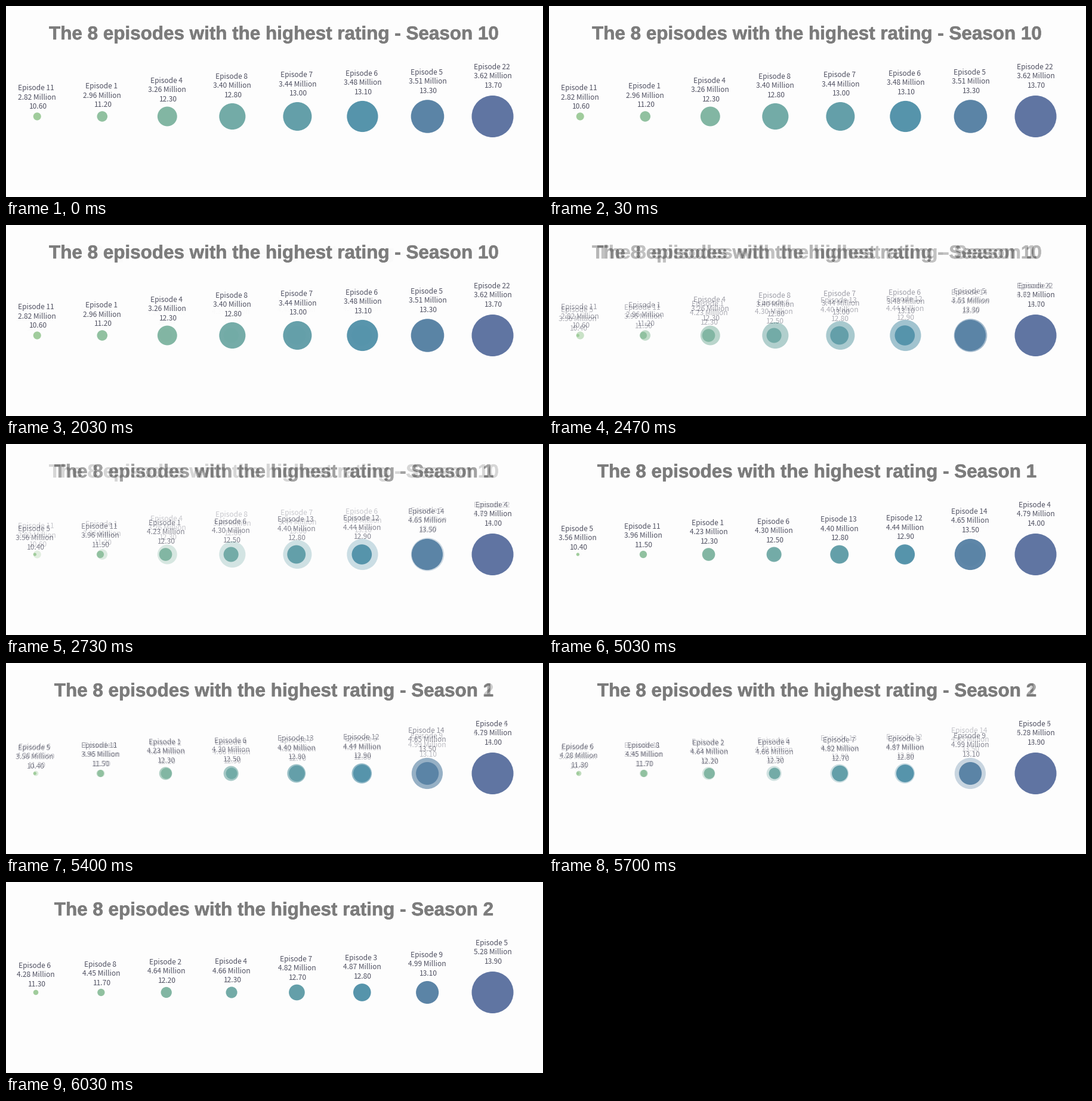
A matplotlib script for the animation above (8 s loop, 900 by 320 pixels).

```python
import numpy as np
import matplotlib.pyplot as plt
from matplotlib.animation import FuncAnimation
from matplotlib.colors import LinearSegmentedColormap
from matplotlib.patches import Circle
from matplotlib.patheffects import withStroke

W, H, DPI = 900, 320, 100
LOOP, STEP = 8000, 32
HOLD, PERIOD, FADE = 2000, 3000, 1030

BG, TITLE, LABEL = "#fdfdfd", "#7c7c7c", "#505162"
SHADES = LinearSegmentedColormap.from_list("bubbles", [
    (0, "#a0cc9c"), (3 / 7, "#73aba7"), (5 / 7, "#5694ab"), (1, "#6075a2")])

R_MAX, GROWTH = 35, 2.1          # bubble size grows exponentially with viewers
LEFT, RIGHT, MID_Y = 45.7, 815.5, 185
LINE = 15.5

# season: "episode viewers rating", least watched first
SEASONS = {
    10: "11 2.82 10.60, 1 2.96 11.20, 4 3.26 12.30, 8 3.40 12.80, "
        "7 3.44 13.00, 6 3.48 13.10, 5 3.51 13.30, 22 3.62 13.70",
    1: "5 3.56 10.40, 11 3.96 11.50, 1 4.23 12.30, 6 4.30 12.50, "
       "13 4.40 12.80, 12 4.44 12.90, 14 4.65 13.50, 4 4.79 14.00",
    2: "6 4.28 11.30, 8 4.45 11.70, 2 4.64 12.20, 4 4.66 12.30, "
       "7 4.82 12.70, 3 4.87 12.80, 9 4.99 13.10, 5 5.28 13.90",
}

fig = plt.figure(figsize=(W / DPI, H / DPI), dpi=DPI, facecolor=BG)


def stage():
    ax = fig.add_axes([0, 0, 1, 1])
    ax.set(xlim=(0, W), ylim=(H, 0))
    ax.axis("off")
    return ax


def write(ax, x, y, text, px, color, font, **style):
    ax.text(x, y, text, fontsize=px * 72 / DPI, color=color, family=font,
            ha="center", va="baseline", **style)


def render(season, rows):
    """Draw one season's chart and return it as an RGB array."""
    ax = stage()
    write(ax, 449.5, 56, f"The 8 episodes with the highest rating - Season {season}",
          31.4, TITLE, "Liberation Sans", weight="bold",
          path_effects=[withStroke(linewidth=0.4, foreground=TITLE)])

    rows = [row.split() for row in rows.split(", ")]
    viewers = np.array([float(row[1]) for row in rows])
    radii = R_MAX * np.exp(GROWTH * (viewers - viewers.max()))
    xs = np.linspace(LEFT + radii[0], RIGHT, len(rows))
    shades = SHADES(np.linspace(0, 1, len(rows)))

    for x, r, shade, (episode, million, rating) in zip(xs, radii, shades, rows):
        ax.add_patch(Circle((x, MID_Y), r, color=shade, lw=0))
        lines = (f"Episode {episode}", f"{million} Million", rating)
        top = MID_Y - 4.7 - 1.25 * r - 2 * LINE
        for i, text in enumerate(lines):
            write(ax, x + 1.5 * (i - 1), top + i * LINE, text, 12, LABEL,
                  "Noto Sans CJK JP")

    fig.canvas.draw()
    image = np.asarray(fig.canvas.buffer_rgba())[..., :3] / 255
    ax.remove()
    return image


charts = [render(*season) for season in SEASONS.items()]
view = stage().imshow(charts[0], extent=(0, W, H, 0), aspect="auto",
                      interpolation="nearest")


def update(i):
    shown, t = divmod(i * STEP, PERIOD)
    p = np.clip((t - HOLD) / FADE, 0, 1)
    following = charts[min(shown + 1, len(charts) - 1)]
    view.set_data((1 - p) * charts[shown] + p * following)
    return [view]


anim = FuncAnimation(fig, update, frames=LOOP // STEP, interval=STEP,
                     repeat=True, repeat_delay=0)
plt.show()
```
